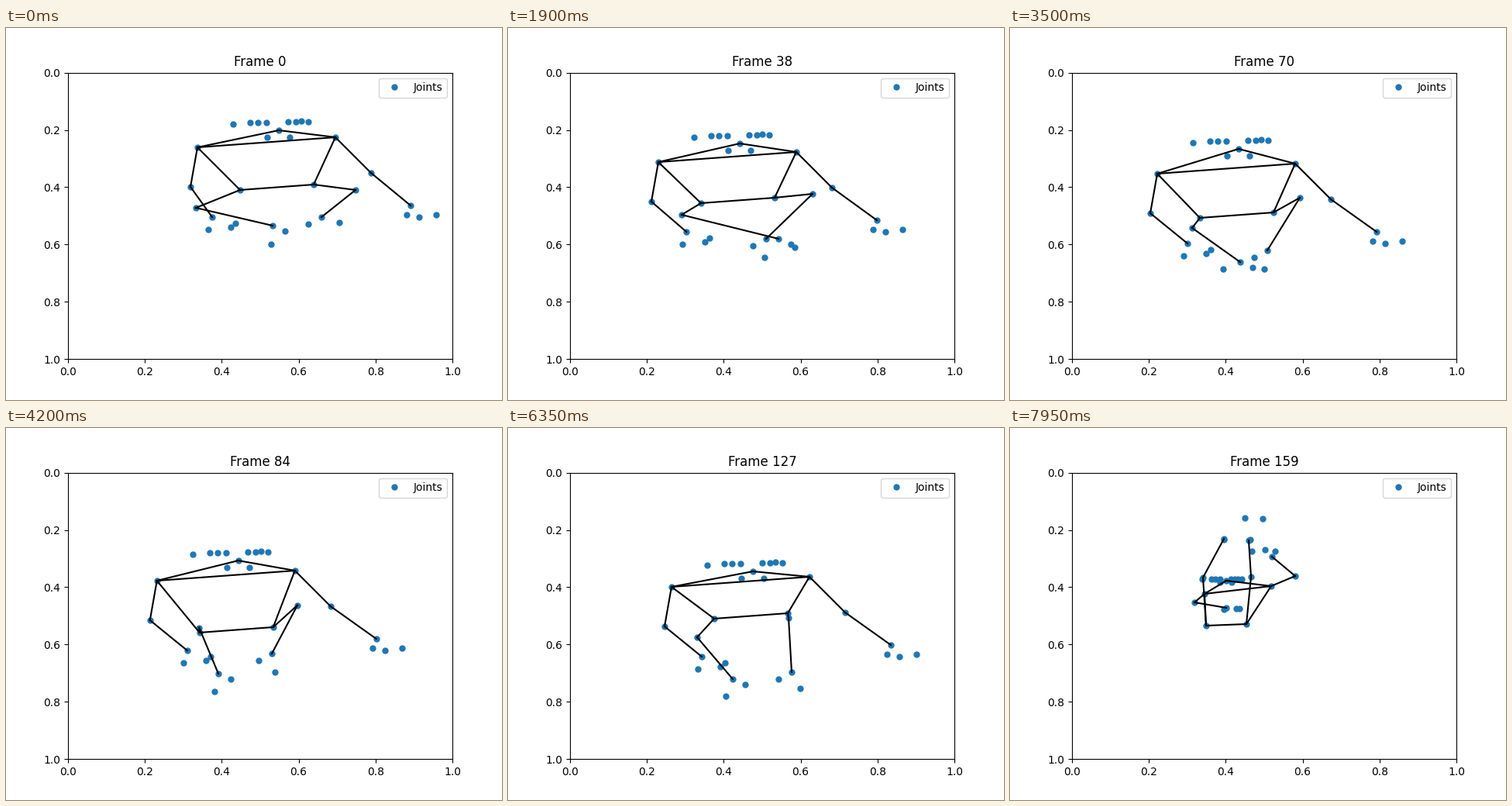
A matplotlib script that plays this animation: 640 by 480 pixels, repeating every 8000 ms.

```python
import numpy as np
import matplotlib.pyplot as plt
from matplotlib.animation import FuncAnimation

N = 160
FRAMES = np.arange(N)
TIMES = np.array([0, 20, 38, 70, 98, 127])
ORIGIN, SIZE = np.array([80, 57.6]), np.array([496, 369.6])


def smooth(start, end):
    u = np.clip((FRAMES - start) / (end - start), 0, 1)
    return u * u * (3 - 2 * u)


def bump(start, end):
    u = np.clip((FRAMES - start) / (end - start), 0, 1)
    return np.sin(np.pi * u)


def path(*keys):
    """Monotone cubic through one value per key time, held at the end."""
    p = np.array(keys, float)
    h = np.diff(TIMES)
    d = np.diff(p) / h
    same = d[:-1] * d[1:] > 0
    mid = np.where(same, 2 * d[:-1] * d[1:] / np.where(same, d[:-1] + d[1:], 1), 0)
    m = np.concatenate([d[:1], mid, [0]])
    k = np.clip(np.searchsorted(TIMES, FRAMES, "right") - 1, 0, len(h) - 1)
    u = np.clip((FRAMES - TIMES[k]) / h[k], 0, 1)
    return (p[k] * (1 + 2 * u) * (1 - u) ** 2 + m[k] * h[k] * u * (1 - u) ** 2
            + p[k + 1] * u * u * (3 - 2 * u) + m[k + 1] * h[k] * u * u * (u - 1))


def xy(x, y):
    return np.stack(np.broadcast_arrays(x, y, FRAMES)[:2], axis=-1).astype(float)


def foot(ankle, heel, length, *angles):
    a = np.radians(path(*angles))
    return ankle + np.array(heel), ankle + length * xy(np.cos(a), np.sin(a))


# Lying pose in pixels: the upper body hangs rigidly from the drifting nose,
# shoulders and hips sink a little on their own
nose = xy(path(352, 327, 299, 295, 307, 316) - 9 * bump(38, 70),
          path(132, 139, 149, 156, 184, 185))
sink = path(-1, 1, 1, 9, -3, -3)
hip_sink = path(-2, 1, -2, 10, 16, -18)
spread = 20 * smooth(15, 45) - 10
pose = {
    "nose": nose,
    "l_shoulder": nose + xy(73, 10 + sink),
    "r_shoulder": nose + xy(-105, 23 + sink),
    "l_elbow": nose + xy(119, 56 + sink),
    "r_elbow": nose + xy(-114, 74 + sink),
    "l_wrist": nose + xy(174 + 0.4 * spread, 98 + sink),
    "r_wrist": nose + xy(-76 + spread, 113 + sink),
    "l_hip": nose + xy(45, 72 + hip_sink),
    "r_hip": nose + xy(-50, 79 + hip_sink),
}

# Pedalling legs
kick = 20 * bump(0, 20) + 14 * bump(70, 98) + 8 * bump(98, 127)
pose["l_knee"] = xy(path(451, 427, 393, 374, 378, 362), path(209, 232, 214, 219, 239, 245))
pose["r_knee"] = xy(path(245, 263, 224, 235, 260, 244),
                    path(232, 244, 241, 258, 249, 270) + 0.3 * kick)
pose["l_ankle"] = xy(path(407, 370, 333, 332, 357, 366), path(244, 252, 272, 287, 296, 315))
pose["r_ankle"] = xy(path(344, 320, 349, 297, 261, 290),
                     path(255, 267, 272, 302, 309, 324) + 0.8 * kick)
pose["l_heel"], pose["l_toe"] = foot(pose["l_ankle"], (-17, 9), 24, 17, 50, 95, 99, 62, 63)
pose["r_heel"], pose["r_toe"] = foot(pose["r_ankle"], (16, 7), 24, 94, 32, 27, 158, 45, 113)

# Curled-up pose that the figure flips into
CURLED = {
    "nose": (279, 197), "l_shoulder": (337, 204), "r_shoulder": (251, 214),
    "l_elbow": (368, 191), "r_elbow": (238, 225),
    "l_wrist": (338, 166), "r_wrist": (279, 232),
    "l_hip": (305, 253), "r_hip": (253, 255),
    "l_knee": (311, 192), "r_knee": (249, 193),
    "l_ankle": (308, 145), "r_ankle": (276, 143),
    "l_heel": (310, 144), "r_heel": (276, 144),
    "l_toe": (326, 117), "r_toe": (303, 116),
}
flip = smooth(138, 152)[:, None]
for name, end in CURLED.items():
    pose[name] += flip * (np.array(end) - pose[name])

# The right arm swings out before it settles
reach = bump(145, 159)
pose["r_elbow"] += xy(-73 * reach, -3 * reach)
pose["r_wrist"] += xy(-189 * reach, -17 * reach)

# Small parts around one joint, with their scale after the flip
FACE = [(-59, -8), (-37, -10), (-27, -10), (-16, -10), (12, -11),
        (22, -11), (29, -12), (38, -11), (-15, 9), (14, 9)]
L_HAND = [(-5, 12), (11, 15), (33, 12)]
R_HAND = [(-5, 16), (24, 13), (30, 8)]


def cluster(joint, offsets, end_scale):
    scale = 1 + flip * (np.array(end_scale) - 1)
    return pose[joint][:, None] + np.array(offsets) * scale[:, None]


dots = np.concatenate([
    np.stack(list(pose.values()), axis=1),
    cluster("nose", FACE, (0.52, 0.2)),
    cluster("l_wrist", L_HAND, (-0.8, -0.6)),
    cluster("r_wrist", R_HAND, (0.55, 0.1)),
], axis=1)
dots = (dots - ORIGIN) / SIZE

BONES = [("nose", "l_shoulder"), ("nose", "r_shoulder"),
         ("l_shoulder", "r_shoulder"), ("l_hip", "r_hip")]
for s in "lr":
    for chain in (("shoulder", "elbow", "wrist"), ("shoulder", "hip", "knee", "ankle")):
        BONES += [(f"{s}_{a}", f"{s}_{b}") for a, b in zip(chain, chain[1:])]
names = list(pose)
ends = [[names.index(a), names.index(b)] for a, b in BONES]

fig, ax = plt.subplots(figsize=(6.4, 4.8), dpi=100)
ax.set_xlim(0, 1)
ax.set_ylim(1, 0)
marks, = ax.plot([], [], "o", markersize=5, label="Joints")
lines = [ax.plot([], [], "k-")[0] for _ in BONES]
ax.legend(loc="upper right")
title = ax.set_title("Frame 0")


def update(i):
    marks.set_data(*dots[i].T)
    for line, pair in zip(lines, ends):
        line.set_data(*dots[i, pair].T)
    title.set_text(f"Frame {i}")
    return [marks, title, *lines]


anim = FuncAnimation(fig, update, frames=N, interval=50, repeat=True, repeat_delay=0)
plt.show()
```
